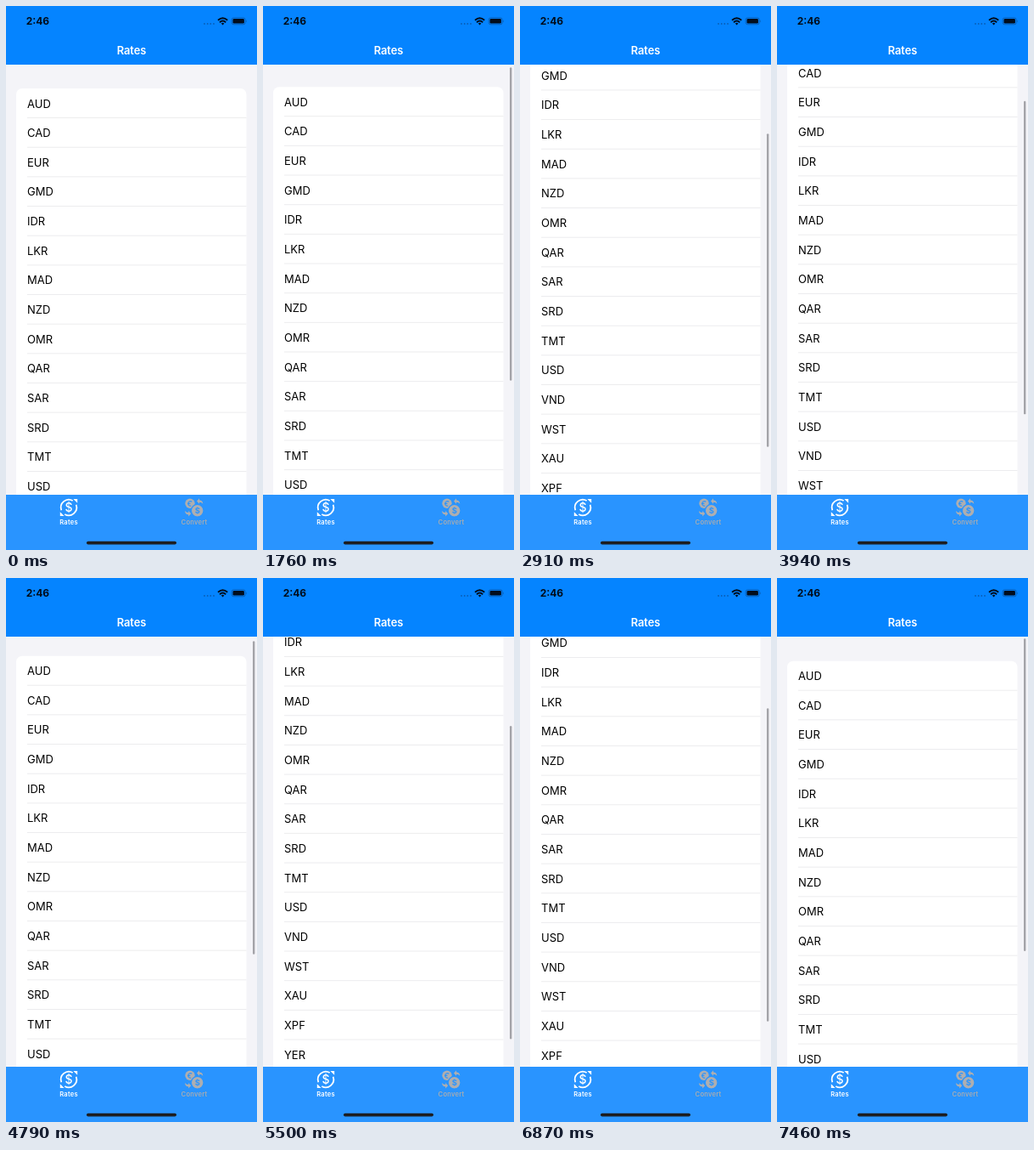
Animation, 296 px wide and 640 px high, one loop 7540 ms. Source, as an HTML page:

```html
<!DOCTYPE html>
<html lang="en">
<head>
<meta charset="utf-8">
<title>Rates</title>
<style>
html, body { margin: 0; width: 100%; height: 100%; overflow: hidden; background: #f4f4f8; }
svg { display: block; width: 296px; height: 640px; font-family: Inter, Roboto, sans-serif; }
.row { font-size: 13px; }
.title { font-size: 13px; font-weight: 600; letter-spacing: -.1px; fill: #fff; }
.clock { font-size: 12px; font-weight: 700; fill: #020d1c; }
.tab { font-size: 7.6px; font-weight: 600; letter-spacing: .2px; }
.mid { text-anchor: middle; }
</style>
</head>
<body>
<svg viewBox="0 0 296 640">
  <g id="list">
    <rect x="12" y="97" width="271.5" height="762" rx="7" fill="#fff"/>
  </g>
  <rect id="bar" x="291" width="2.4" rx="1.2" fill="#a4a4a9"/>

  <rect width="296" height="69" fill="#0584ff"/>
  <text class="clock" x="23.7" y="22.4">2:46</text>
  <g fill="#0a5bb0">
    <circle cx="234" cy="20.9" r=".9"/><circle cx="237.7" cy="20.9" r=".9"/>
    <circle cx="241.3" cy="20.9" r=".9"/><circle cx="245" cy="20.9" r=".9"/>
  </g>
  <g fill="none" stroke="#020d1c" stroke-width="1.9">
    <path d="M250 16.8Q255.6 11.8 261.2 16.8M252 19.2Q255.6 16 259.2 19.2"/>
    <path d="M253.8 20.6Q255.6 19 257.4 20.6L255.6 22.6Z" fill="#020d1c" stroke="none"/>
  </g>
  <rect x="266.2" y="13.8" width="16" height="8" rx="2.4" fill="none" stroke="#0a57a8" stroke-width=".8"/>
  <rect x="267.5" y="15.1" width="13.4" height="5.4" rx="1.3" fill="#020d1c"/>
  <path d="M283.2 16.4q1.4 1.4 0 2.8z" fill="#0a57a8"/>
  <text class="title mid" x="148" y="56.7">Rates</text>

  <rect y="575" width="296" height="65" fill="#2994ff"/>
  <g fill="none" stroke="#fff" stroke-width="1.8">
    <path d="M65.3 593.2A9.3 9.3 0 0 1 78.7 582M82.7 586.8A9.3 9.3 0 0 1 69.3 598"/>
    <path d="M79.4 580h4.8v4.8zM68.6 600h-4.8v-4.8z" fill="#fff" stroke="none"/>
  </g>
  <text class="mid" x="74" y="595" font-size="14" font-weight="500" fill="#fff">$</text>
  <text class="tab mid" x="74" y="609.8" fill="#fff">Rates</text>

  <g fill="#aeaeb0">
    <circle cx="217" cy="585.3" r="5.7"/>
    <circle cx="225.7" cy="593.7" r="7.3" stroke="#2994ff" stroke-width="1.2"/>
    <path d="M225 582.5l3-3.2v2q4 .3 4.3 4.5-1.4-2.1-4.3-2.1v2zM218.2 597.3l-3 3.2v-2q-4-.3-4.3-4.5 1.4 2.1 4.3 2.1v-2z"/>
  </g>
  <path d="M219.2 583.3a2.7 2.7 0 1 0-1 4.7M214 585.4h3.4" fill="none" stroke="#2994ff" stroke-width="1.1"/>
  <text class="mid" x="225.7" y="597.1" font-size="9.3" font-weight="700" fill="#2994ff">$</text>
  <text class="tab mid" x="222" y="609.8" fill="#a6abb2">Convert</text>
  <rect x="95" y="629.7" width="106" height="3.8" rx="1.9" fill="#1d1d20"/>
</svg>
<script>
const LOOP = 7540, TICK = 117, ROW = 34.66, TOP = 97, BOUNCE = 2;
const codes = 'AUD CAD EUR GMD IDR LKR MAD NZD OMR QAR SAR SRD TMT USD VND WST XAU XPF YER'.split(' ');
const list = document.getElementById('list'), bar = document.getElementById('bar');

list.innerHTML += codes.map((code, i) => {
  const y = TOP + i * ROW;
  return `<text class="row" x="25" y="${y + 22.5}">${code}</text>
    <rect x="25" y="${y + ROW - .6}" width="258.5" height="1" fill="#ececee"/>`;
}).join('');

const ease = u => (1 - Math.cos(Math.PI * Math.min(Math.max(u, 0), 1))) / 2;

// A flick that coasts to a stop, and a drag back to the top with a slight bounce.
const flick = (ms, far) => far * (1 - (1 + ms / 180) * Math.exp(-ms / 180));
const pull = (ms, far) =>
  far - (far + BOUNCE) * ease(ms / 785) + BOUNCE * ease((ms - 785) / 300);

const moves = [
  { at: 1760, lead: 31, far: 139, go: flick },
  { at: 3580, lead: 35, far: 139, go: pull },
  { at: 4790, lead: 46, far: 193.4, go: flick },
  { at: 6520, lead: 35, far: 193.4, go: pull }
];

function scrollAt(t) {
  const move = moves.findLast(m => m.at <= t);
  if (!move) return 0;
  const held = Math.floor((t - move.at) / TICK) * TICK;
  return move.go(held + move.lead, move.far);
}

function draw(now) {
  const t = now % LOOP, pos = scrollAt(t);
  list.setAttribute('transform', `translate(0 ${-pos})`);
  bar.setAttribute('y', 71.2 + .578 * Math.max(pos, 0));
  bar.setAttribute('height', 368.5 + Math.min(pos, 0));
  bar.setAttribute('opacity', t < moves[0].at ? 0 : 1);
}

let origin;
function frame(now) {
  origin ??= now;
  draw(now - origin);
  requestAnimationFrame(frame);
}
draw(0);
requestAnimationFrame(frame);
</script>
</body>
</html>
```
